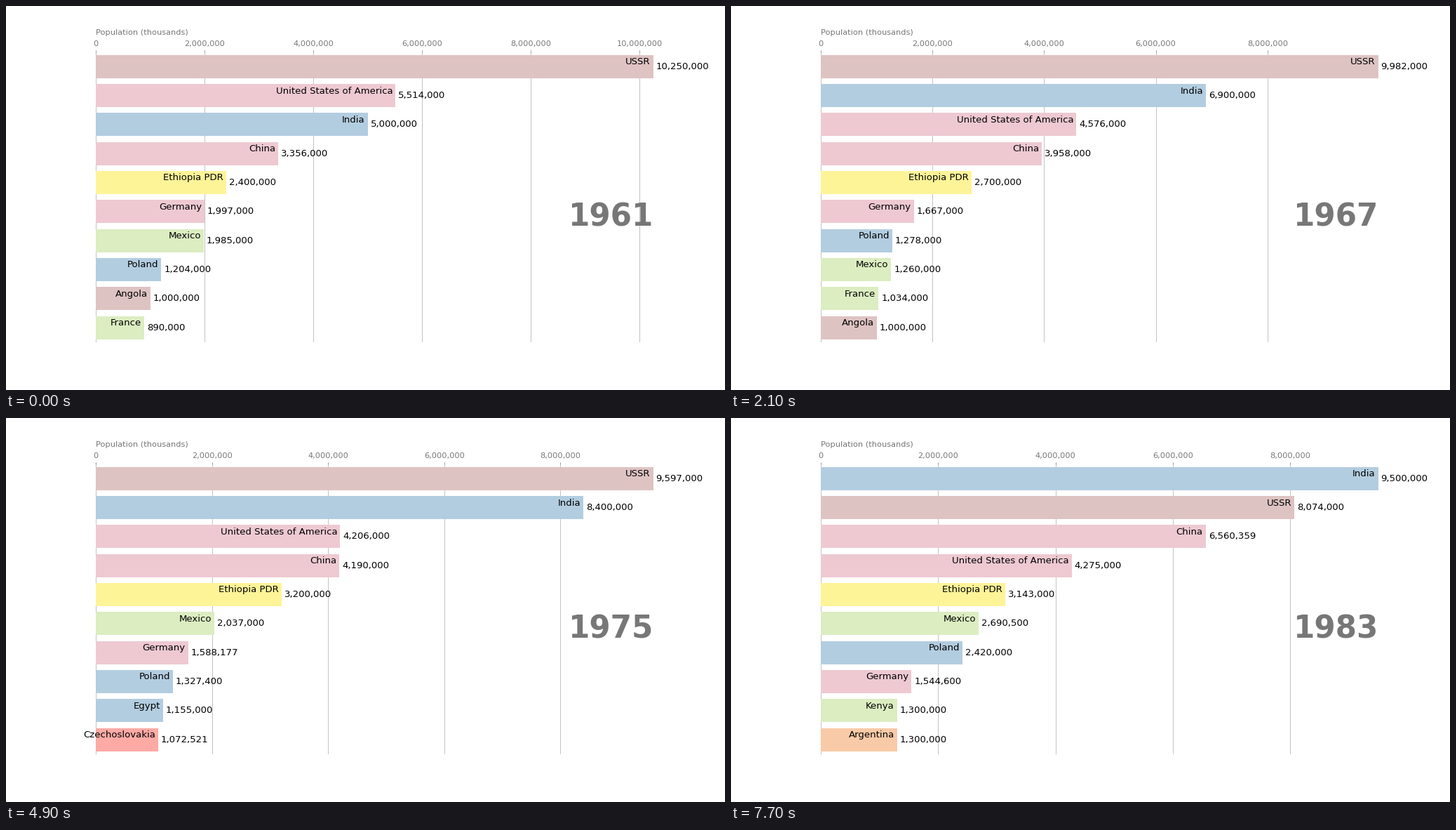
A matplotlib script for the animation above (8 s loop, 1025x547 px).

```python
import matplotlib.pyplot as plt
import numpy as np
from matplotlib.animation import FuncAnimation
from matplotlib.ticker import StrMethodFormatter

plt.rcParams["font.family"] = "DejaVu Sans"

DPI = 100
PT = 1025 / 15 / DPI          # scales point sizes to a 15 inch wide layout
STEP = 50                     # ms per animation frame
HOLD = 7                      # animation frames per year
FRAMES = 160
FIRST_YEAR = 1961

GREY = "#777777"
BROWN, PINK, BLUE = "#dec3c3", "#eec9d2", "#b3cde0"
YELLOW, GREEN, RED, ORANGE = "#fdf498", "#dcedc1", "#ffaaa5", "#f9caa7"

# Values in thousands at the key years; the years between are interpolated.
KEY_YEARS = [1961, 1965, 1969, 1971, 1975, 1979, 1983]
COUNTRIES = {
    "USSR": (BROWN, [10250, 9930, 9847, 9765, 9597, 8465, 8074]),
    "United States of America": (PINK, [5514, 4718, 4433, 4107, 4206, 4163, 4275]),
    "India": (BLUE, [5000, 6300, 7500, 8000, 8400, 8500, 9500]),
    "China": (PINK, [3356, 3757, 4160, 4370, 4190, 4429.315, 6560.359]),
    "Ethiopia PDR": (YELLOW, [2400, 2600, 2800, 2900, 3200, 3330, 3143]),
    "Germany": (PINK, [1997, 1720.6, 1612.442, 1484.901, 1588.177, 1533.953, 1544.6]),
    "Mexico": (GREEN, [1985, 940, 1580.06, 1618, 2037, 2254.8, 2690.5]),
    "Poland": (BLUE, [1204, 1174, 1381, 1381, 1327.4, 2121.6, 2420]),
    "Angola": (BROWN, [1000] * 7),
    "France": (GREEN, [890, 969.314, 1097.9, 1000, 1015, 1350, 1200]),
    "Greece": (BLUE, [850, 958, 990, 1000, 1000, 1000, 1100]),
    "Czechoslovakia": (RED, [850, 900, 1046.674, 1060.538, 1072.521, 1000, 1000]),
    "Romania": (BROWN, [500, 800, 950, 1011.27, 1000, 1000, 1100]),
    "Egypt": (BLUE, [700, 800, 900, 950, 1155, 1050, 1100]),
    "Argentina": (ORANGE, [700, 800, 900, 950, 900, 1100, 1300]),
    "Kenya": (GREEN, [400, 500, 600, 700, 850, 1000, 1300]),
}
EXTRA = {
    "USSR": {1962: 10250, 1966: 10050, 1977: 9300},
    "United States of America": {1970: 4285, 1974: 4210, 1978: 4081},
    "India": {1980: 9000, 1981: 9000, 1982: 9400},
    "France": {1977: 1000, 1982: 1150},
    "Czechoslovakia": {1968: 990, 1972: 1065, 1973: 1017, 1974: 1035,
                       1976: 1065, 1977: 1012},
    "Argentina": {1982: 1200},
    "Kenya": {1982: 1250},
}


def value_at(name, year):
    points = dict(zip(KEY_YEARS, COUNTRIES[name][1]))
    points.update(EXTRA.get(name, {}))
    if year in points:
        return round(points[year] * 1000)
    years = sorted(points)
    return round(np.interp(year, years, [points[y] for y in years])) * 1000


def top_ten(year):
    rows = [(value_at(name, year), name) for name in COUNTRIES]
    return sorted(rows, key=lambda row: row[0])[-10:]


fig, ax = plt.subplots(figsize=(10.25, 5.47), dpi=DPI, facecolor="white")
fig.subplots_adjust(left=0.125, right=0.9, bottom=0.125, top=0.88)
shown = {"year": None}


def draw_chart(year):
    rows = top_ten(year)
    values = [value for value, _ in rows]
    gap = max(values) / 200

    ax.clear()
    ax.barh(range(10), values, color=[COUNTRIES[name][0] for _, name in rows])
    for i, (value, name) in enumerate(rows):
        ax.text(value - gap, i, name, size=14 * PT, ha="right", va="bottom")
        ax.text(value + gap, i, f"{value:,}", size=14 * PT, ha="left", va="center")

    ax.text(1, 0.4, str(year), transform=ax.transAxes, color=GREY,
            size=46 * PT, ha="right", weight="bold")
    ax.text(0, 1.06, "Population (thousands)", transform=ax.transAxes,
            color=GREY, size=12 * PT)

    ax.xaxis.set_major_formatter(StrMethodFormatter("{x:,.0f}"))
    ax.xaxis.set_ticks_position("top")
    ax.tick_params(axis="x", colors=GREY, labelsize=12 * PT,
                   length=3.5 * PT, width=0.8 * PT, pad=3.5 * PT)
    ax.set_yticks([])
    ax.margins(0, 0.01)
    ax.grid(axis="x", color="#b0b0b0", linestyle="-", linewidth=0.8 * PT)
    ax.set_axisbelow(True)
    ax.set_frame_on(False)


def update(frame):
    year = FIRST_YEAR + frame // HOLD
    if year != shown["year"]:
        draw_chart(year)
        shown["year"] = year
    return []


def reset():
    shown["year"] = None
    return update(0)


anim = FuncAnimation(fig, update, frames=FRAMES, init_func=reset,
                     interval=STEP, repeat=True, repeat_delay=0, blit=False)
plt.show()
```
